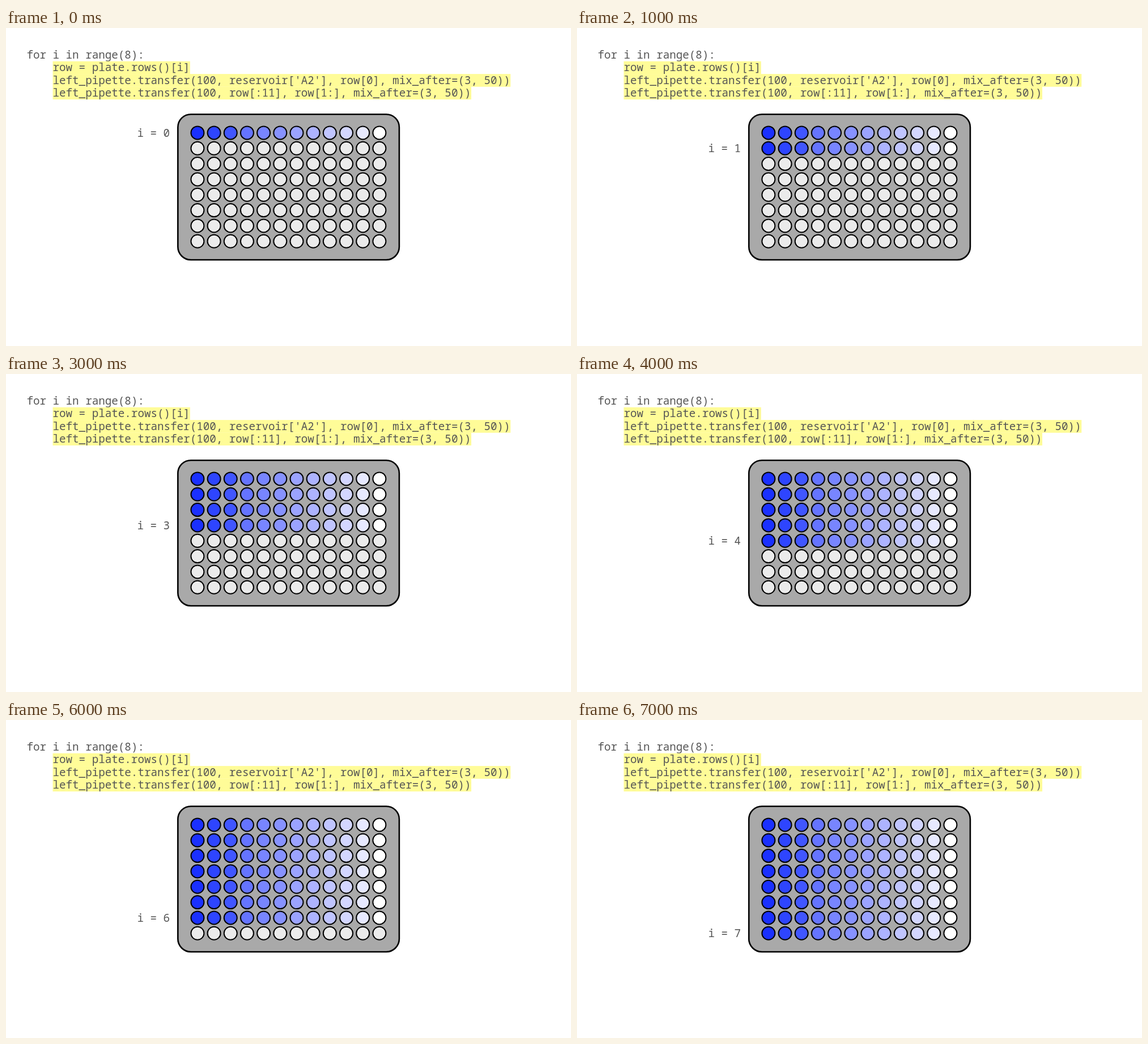
These frames come from a looping animation (997 px wide and 561 px high, 9 s). An HTML page:

```html
<!DOCTYPE html>
<html lang="en">
<head>
<meta charset="utf-8">
<title>Serial dilution loop</title>
<style>
  html, body { margin: 0; width: 100%; height: 100%; overflow: hidden; background: #fff; }
  svg { display: block; width: 997px; height: 561px; }
  text {
    font: 19.23px "Noto Sans Mono", monospace;
    font-variant-ligatures: none;
    fill: #555;
  }
</style>
</head>
<body>
<svg id="stage" viewBox="0 0 997 561"></svg>
<script>
const LOOP_MS = 9000, STEP_MS = 1000;
const ROWS = 8, COLUMNS = 12;
const CHAR_WIDTH = 11.54, LINE_HEIGHT = 22.4;
const EMPTY = '#ebebeb';
const DILUTION = ['#1a30ff', '#2e45ff', '#4156ff', '#6574ff', '#7885ff', '#8792ff',
                  '#9ba3ff', '#adb3ff', '#c0c5ff', '#d3d6ff', '#e7e9ff', '#ffffff'];
const CODE = [
  'for i in range(8):',
  'row = plate.rows()[i]',
  "left_pipette.transfer(100, reservoir['A2'], row[0], mix_after=(3, 50))",
  'left_pipette.transfer(100, row[:11], row[1:], mix_after=(3, 50))'
];
const stage = document.getElementById('stage');

function add(tag, attributes, text = '') {
  const node = document.createElementNS('http://www.w3.org/2000/svg', tag);
  for (const [name, value] of Object.entries(attributes)) node.setAttribute(name, value);
  node.textContent = text;
  return stage.appendChild(node);
}

const rowY = row => 184.9 + row * 27.34;

CODE.forEach((line, n) => {
  const x = n ? 82.5 : 36.4;
  if (n) {
    add('rect', {
      x, y: 58.7 + (n - 1) * LINE_HEIGHT,
      width: line.length * CHAR_WIDTH, height: LINE_HEIGHT + 0.2, fill: '#fffc98'
    });
  }
  add('text', { x, y: 53.8 + n * LINE_HEIGHT }, line);
});

add('rect', {
  x: 303.3, y: 152.2, width: 390.6, height: 256.8, rx: 23,
  fill: '#a9a9a9', stroke: '#000', 'stroke-width': 2.6
});

const wells = Array.from({ length: ROWS }, (_, row) =>
  Array.from({ length: COLUMNS }, (_, column) => add('circle', {
    cx: 337.9 + column * 29.18, cy: rowY(row), r: 11.5,
    stroke: '#000', 'stroke-width': 2
  })));
const label = add('text', { x: 231.4 });

function draw() {
  const current = Math.min(ROWS - 1, Math.floor(performance.now() % LOOP_MS / STEP_MS));
  wells.forEach((cells, row) => cells.forEach((well, column) =>
    well.setAttribute('fill', row <= current ? DILUTION[column] : EMPTY)));
  label.textContent = `i = ${current}`;
  label.setAttribute('y', rowY(current) + 6.8);
  requestAnimationFrame(draw);
}
draw();
</script>
</body>
</html>
```
